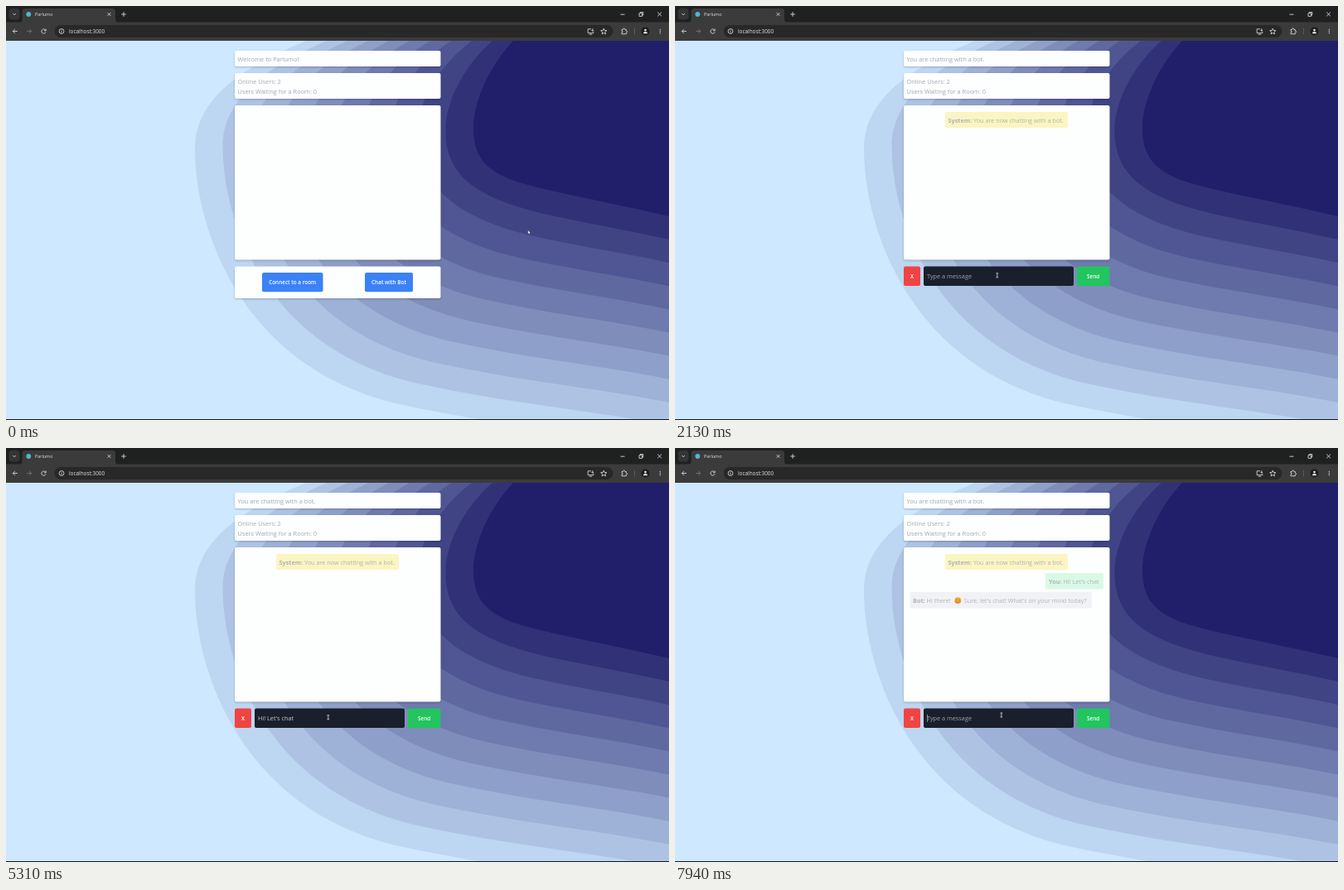
An HTML page for the animation above (8000 ms loop, 800 by 500 pixels).

```html
<!DOCTYPE html>
<html lang="en">
<head>
<meta charset="utf-8">
<title>Parlumo</title>
<style>
  html, body { margin: 0; width: 100%; height: 100%; overflow: hidden; background: #cde8ff; }
  svg { display: block; width: 100vw; height: 100vh; }
  text { font: 7.4px "Open Sans", "Noto Sans", sans-serif; fill: #a0a7b6; white-space: pre; }
  .bold { font-weight: 700; }
  .small { font-size: 6.4px; fill: #e4e4e4; }
  .button { font-size: 6.4px; font-weight: 600; fill: #fff; text-anchor: middle; }
  .panel { fill: #fdfefe; filter: drop-shadow(0 1px 1.2px rgba(0, 0, 0, .22)); }
  .bubble text { font-size: 7.3px; fill: #aeb2b8; }
  .icon { fill: none; stroke: #d6d6d6; stroke-width: .9; }

  .intro, .chat, .sent, .reply, .arrow, .hand, .beam, .botFill, .botButton { animation: 8s step-end infinite; }
  .intro { animation-name: intro; }
  .chat { animation-name: chat; }
  .sent { animation-name: sent; }
  .reply { animation-name: reply; }
  .arrow { animation-name: arrow; }
  .hand { animation-name: hand; }
  .beam { animation-name: chat; }
  .botFill { animation-name: hover; }
  .botButton { animation-name: press; transform-origin: 462px 333.7px; }
  .cursor { animation: glide 8s ease-in-out infinite; }

  @keyframes intro { 0% { visibility: visible } 9.5%, 100% { visibility: hidden } }
  @keyframes chat { 0% { visibility: hidden } 9.5%, 100% { visibility: visible } }
  @keyframes sent { 0% { visibility: hidden } 69.75%, 100% { visibility: visible } }
  @keyframes reply { 0% { visibility: hidden } 80%, 100% { visibility: visible } }
  @keyframes arrow { 0% { visibility: visible } 6%, 100% { visibility: hidden } }
  @keyframes hand { 0% { visibility: hidden } 6% { visibility: visible } 9.5%, 100% { visibility: hidden } }
  @keyframes hover { 0% { fill: #3b82f6 } 6%, 100% { fill: #2563eb } }
  @keyframes press { 0% { transform: none } 7.75%, 100% { transform: scale(.965) } }
  @keyframes glide {
    0%, .75% { transform: translate(630px, 271px) }
    7.25%, 10.5% { transform: translate(473.5px, 333px) }
    18%, 92.5% { transform: translate(388.7px, 325.2px) }
    97.5%, 100% { transform: translate(393.8px, 322.5px) }
  }
</style>
</head>
<body>
<svg viewBox="0 0 800 500" preserveAspectRatio="none">
  <rect width="800" height="500" fill="#cde8ff"/>
  <g id="waves"></g>
  <rect y="499" width="800" height="1" fill="#14161c"/>

  <g id="browser">
    <rect width="800" height="20" fill="#1f2020"/>
    <rect y="19.5" width="800" height="22.5" fill="#3b3b3b"/>
    <path d="M16 20Q19.500 20 19.500 16V6.500Q19.500 3 23 3H128.500Q132 3 132 6.500V16Q132 20 135.500 20Z" fill="#3b3b3b"/>
    <rect x="3.500" y="3" width="13" height="13.500" rx="4" fill="#343535"/>
    <rect x="58.500" y="23" width="674" height="15" rx="7.500" fill="#282828"/>
    <circle cx="27.300" cy="10" r="2.900" fill="#4fb4d4"/>
    <text class="small" x="35" y="12.200" style="font-size:5.4px">Parlumo</text>
    <text class="small" x="76" y="33">localhost:3000</text>
    <g class="icon">
      <path d="M8.300 9l1.800 1.800L11.900 9M122.700 8.200l3.600 3.600m0-3.600l-3.600 3.600M142 7.200v5.600m-2.800-2.800h5.600"/>
      <path d="M741.500 10.200h5M786.200 7.500l4.800 4.800m0-4.800l-4.800 4.800M764 8.800h3.600v3.600H764zM765.300 8.500V7.500h3.500V11h-1"/>
      <path d="M13.800 30.500H8.300m2.600-2.600l-2.600 2.600 2.600 2.600"/>
      <path d="M25.300 30.500h5.500m-2.600-2.600l2.600 2.600-2.600 2.600" stroke="#777"/>
      <path d="M47.700 29.200A2.600 2.600 0 1 0 48 31.300M48.200 27.500v2.200h-2.200"/>
      <circle cx="67" cy="30.500" r="2.900"/><path d="M67 30.200v1.900m0-3.300v.8"/>
      <path d="M706 27.800h-3.800v4.900h6.600v-1.800M703.800 34.200h3.400M707.800 27.200v3m-1.300-1.200l1.300 1.300 1.300-1.300"/>
      <path d="M721.300 27.100l1 2.400 2.600.2-2 1.700.6 2.500-2.200-1.300-2.200 1.300.6-2.500-2-1.700 2.600-.2z"/>
      <path d="M743 28.500h1.500q.1-1.500 1.200-1.500t1.200 1.500h1.400v1.600q1.300.1 1.300 1.100t-1.300 1.100v1.500H743v-1.700q1.200-.1 1.200-1t-1.200-1z"/>
      <path d="M758.500 26.500v8" stroke="#5c5c5c"/>
    </g>
    <circle cx="771.500" cy="30.500" r="5" fill="#1d1d1d"/>
    <g fill="#ececec">
      <circle cx="771.500" cy="29.100" r="1.300"/><path d="M768.900 33.200q0-2.200 2.600-2.200t2.600 2.200z"/>
      <circle cx="789.300" cy="28.300" r=".65"/><circle cx="789.300" cy="30.500" r=".65"/><circle cx="789.300" cy="32.700" r=".65"/>
    </g>
  </g>

  <rect class="panel" x="276" y="54" width="248.500" height="19" rx="2"/>
  <rect class="panel" x="276" y="81" width="248.500" height="31" rx="2"/>
  <rect class="panel" x="276" y="120" width="248.500" height="186.500" rx="2"/>
  <text x="279.500" y="93.700">Online Users: 2</text>
  <text x="279.500" y="105.600">Users Waiting for a Room: 0</text>

  <g class="intro">
    <text x="279.500" y="66.600">Welcome to Parlumo!</text>
    <rect class="panel" x="276" y="314.500" width="248.500" height="38.500" rx="2"/>
    <rect x="309" y="322" width="73.500" height="23.300" rx="2" fill="#3b82f6"/>
    <text class="button" x="345.700" y="336.200">Connect to a room</text>
    <g class="botButton">
      <rect class="botFill" x="433" y="322" width="58" height="23.300" rx="2"/>
      <text class="button" x="462" y="336.200">Chat with Bot</text>
    </g>
  </g>

  <g class="chat">
    <text x="279.500" y="66.600">You are chatting with a bot.</text>
    <g class="bubble">
      <rect x="326" y="128" width="148" height="19" rx="2" fill="#fbf5c2"/>
      <text x="329.500" y="140.500"><tspan class="bold">System:</tspan> You are now chatting with a bot.</text>
    </g>
    <rect x="276" y="314.500" width="20" height="23.500" rx="2" fill="#ef4444"/>
    <text class="button" x="286" y="328.700">X</text>
    <rect x="300" y="314.500" width="181" height="23.500" rx="2" fill="#1a202b"/>
    <rect x="485" y="314.500" width="39.500" height="23.500" rx="2" fill="#22c55e"/>
    <text class="button" x="504.700" y="328.700">Send</text>
    <text id="entry" x="304" y="329.200" style="font-size:7.3px"></text>
    <rect id="caret" y="321.800" width=".6" height="9" fill="#d5d9e0"/>
  </g>

  <g class="bubble sent">
    <rect x="447" y="151" width="70" height="19.500" rx="2" fill="#d9f9e6"/>
    <text x="451" y="163.500"><tspan class="bold">You:</tspan> Hi! Let's chat</text>
  </g>
  <g id="dots" fill="#1f2535"></g>
  <g class="bubble reply">
    <rect x="283.500" y="174" width="219.500" height="19.500" rx="2" fill="#f1f2f5"/>
    <text x="287" y="187"><tspan class="bold">Bot:</tspan> Hi there!</text>
    <circle cx="341.300" cy="184.300" r="4" fill="#f4ad3d"/>
    <circle cx="338.800" cy="185.300" r="1.100" fill="#ee7d4b"/><circle cx="343.800" cy="185.300" r="1.100" fill="#ee7d4b"/>
    <path d="M339 183.400q.7-1 1.400 0m1.800 0q.7-1 1.400 0M339.600 185.800q1.700 1.800 3.400 0" fill="none" stroke="#74402b" stroke-width=".6"/>
    <text x="348.800" y="187">Sure, let's chat! What's on your mind today?</text>
  </g>

  <g class="cursor">
    <path class="arrow" d="M-.2-.2V4.300L.9 3.400 1.700 5 2.500 4.600 1.700 3.100H3Z" fill="#fff" stroke="#111" stroke-width=".3"/>
    <path class="hand" d="M-.5-1.500q.6-.6 1.100 0V.6l2 .5q.6.2.5.9L2.700 4H.2L-1.700 1.700q.1-.8 1.200 0Z" fill="#fff" stroke="#111" stroke-width=".35"/>
    <path class="beam" d="M-1.200-2.500H1.200M0-2.500V2.500M-1.200 2.500H1.200" fill="none" stroke="#f4f4f4" stroke-width=".8"/>
  </g>
</svg>
<script>
  const LOOP = 8000, MESSAGE = "Hi! Let's chat";
  const FOCUS = 1600, TYPE = 2780, KEY = 130, SEND = 5580, REPLY = 6400;
  const $ = id => document.getElementById(id);
  const mix = (a, b, t) => a + (b - a) * t;
  const mixAll = (a, b, t) => a.map((v, i) => mix(v, b[i], t));

  function add(parent, tag, attrs) {
    const node = document.createElementNS(parent.namespaceURI, tag);
    for (const name in attrs) node.setAttribute(name, attrs[name]);
    return parent.appendChild(node);
  }

  // Nested bands, blended from the outermost curve to the innermost.
  const OUTER = [362, 42, 270, 80, 228, 120, 228, 172, 228, 270, 285, 440, 480, 482, 600, 508, 700, 515, 800, 535];
  const INNER = [612, 42, 585, 70, 563, 115, 564, 150, 565, 205, 610, 212, 680, 228, 722, 237, 762, 245, 800, 254];
  for (let i = 0; i <= 10; i++) {
    const [x, y, ...curve] = mixAll(OUTER, INNER, i / 10);
    const rgb = mixAll([205, 232, 255], [33, 31, 106], (i + 1) / 11).map(Math.round);
    add($("waves"), "path", { d: `M${x} ${y}C${curve.join(" ")}V42Z`, fill: `rgb(${rgb})` });
  }

  const dots = [0, 200, 300].map((delay, i) => ({ delay, x: 291.5 + i * 6.5, node: add($("dots"), "ellipse", {}) }));

  function drawDots(t) {
    $("dots").style.display = t >= SEND && t < REPLY ? "" : "none";
    for (const { delay, x, node } of dots) {
      const phase = (t - 6060 - delay + 4000) % 1000;
      const rise = phase < 500 ? phase / 500 : 2 - phase / 500;
      const round = Math.min(1, rise / .4);
      node.setAttribute("cx", x);
      node.setAttribute("cy", mix(301.3, 295, rise * (2 - rise)));
      node.setAttribute("rx", mix(2.4, 1.5, round));
      node.setAttribute("ry", mix(.8, 1.5, round));
    }
  }

  function drawEntry(t) {
    const count = t < SEND ? Math.max(0, Math.min(MESSAGE.length, Math.floor((t - TYPE) / KEY))) : 0;
    const entry = $("entry"), caret = $("caret");
    entry.textContent = count ? MESSAGE.slice(0, count) : "Type a message";
    entry.style.fill = count ? "#c3c8d1" : "#9ca3af";
    caret.setAttribute("x", 304.2 + (count ? entry.getComputedTextLength() : 0));
    const lastKey = t >= SEND ? SEND : count ? TYPE + count * KEY : FOCUS;
    caret.style.display = t >= FOCUS && (t - lastKey) % 1000 < 500 ? "" : "none";
  }

  let start;
  function frame(now) {
    start ??= now;
    const t = (now - start) % LOOP;
    drawEntry(t);
    drawDots(t);
    requestAnimationFrame(frame);
  }
  requestAnimationFrame(frame);
</script>
</body>
</html>
```
